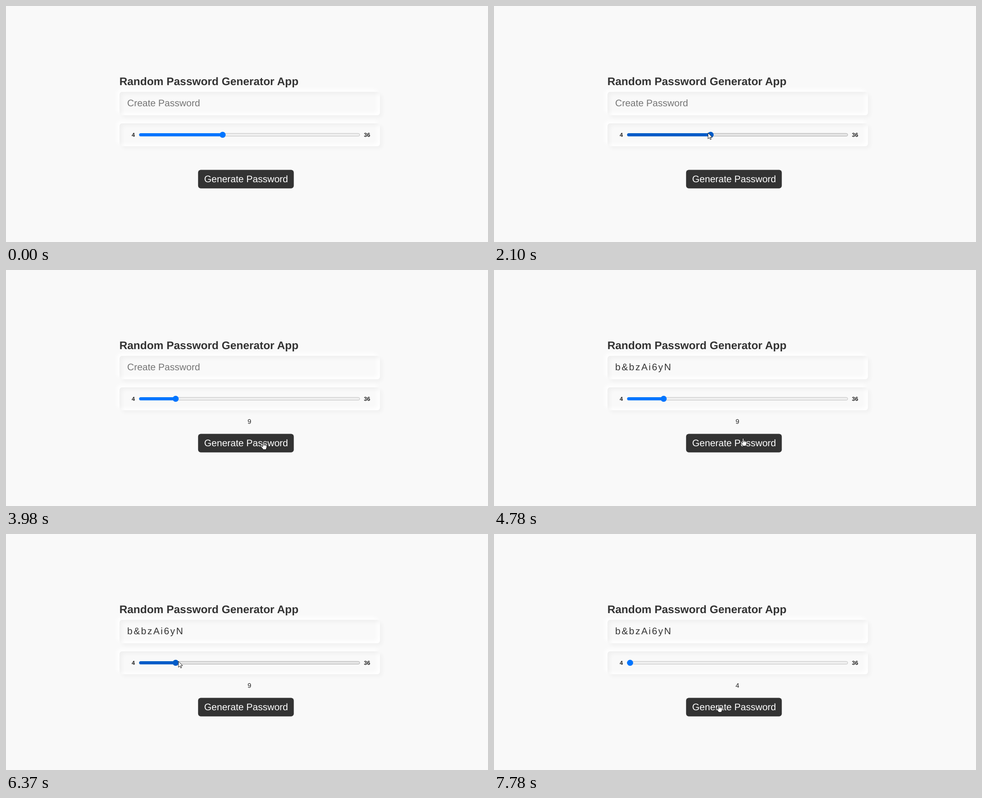
These frames come from a looping animation (1066 by 525 pixels, 8 s). An HTML page:

```html
<!DOCTYPE html>
<html lang="en">
<head>
<meta charset="utf-8">
<title>Random Password Generator App</title>
<style>
  html, body { margin: 0; width: 100%; height: 100%; overflow: hidden; background: #f9f9f9; }
  .panel {
    position: absolute; left: 251px; width: 576px; height: 51.5px; border-radius: 6px;
    box-shadow:
      5px 5px 10px rgba(0, 0, 0, .035), -5px -5px 10px #fff,
      inset 5px 5px 10px rgba(0, 0, 0, .04), inset -5px -5px 10px #fff;
  }
  svg { position: absolute; left: 0; top: 0; }
  text {
    font: 21px "Liberation Sans", Arial, sans-serif; fill: #333;
    white-space: pre; text-rendering: geometricPrecision;
  }
  .title { font-size: 24.4px; font-weight: bold; }
  .limit { font-size: 12.6px; font-weight: bold; fill: #222; }
  .placeholder { fill: #757575; }
  .password { letter-spacing: 2.45px; }
  .caption { fill: #fff; }
  #length { font-size: 14.5px; text-anchor: middle; fill: #222; }

  .idle { --accent: #0075ff; --track: #efefef; --border: #b8b8b8; }
  .hover { --accent: #005cc8; --track: #e5e5e5; --border: #a3a3a3; }
  .active { --accent: #3793ff; --track: #f5f5f5; --border: #cbcbcb; }
  #track { fill: var(--track); stroke: var(--border); stroke-width: .9; }
  #fill, #thumb { fill: var(--accent); }

  .cursor { fill: #fff; stroke: #000; stroke-width: 1.1; stroke-linejoin: round; }
</style>
</head>
<body>
<div class="panel" style="top:191px"></div>
<div class="panel" style="top:260.5px"></div>
<svg width="1066" height="525" viewBox="0 0 1066 525">
  <text class="title" x="250.7" y="175.8">Random Password Generator App</text>
  <text id="field" x="268" y="222.7"></text>
  <text class="limit" x="278" y="291">4</text>
  <text class="limit" x="791.6" y="291">36</text>
  <g id="slider">
    <rect id="track" x="294.9" y="283.4" width="487.4" height="6.2" rx="3.1"/>
    <rect id="fill" x="294.4" y="283" height="7" rx="3.5"/>
    <circle id="thumb" cy="286.5" r="6.7"/>
  </g>
  <text id="length" x="538.3" y="341.6"></text>
  <rect x="424.8" y="364.5" width="211.7" height="41.2" rx="6" fill="#333"/>
  <text class="caption" x="438.2" y="391.6">Generate Password</text>
  <g id="pointer">
    <circle id="press" cy=".5" r="11.5" fill="#ff0" fill-opacity=".5"/>
    <path id="arrow" class="cursor" transform="translate(.3 .3) scale(.8)"
      d="M0 0V16.5L4 12.9 6.4 18.6 9 17.5 6.5 12H11.8Z"/>
    <path id="hand" class="cursor" transform="translate(-6 0) scale(.82)"
      d="M5.8 1.8C5.8.2 8.8.2 8.8 1.8V7C9 6 11.8 6.2 11.8 7.5 12 6.8 14.4 7 14.4 8.5 15 7.8 16.8 8.2 16.8 9.7V14.2C16.8 17 14.8 18 14.8 21.3H6.6C6.6 18.5 3 16.5.8 12.6-.2 10.8 2.5 10.2 3.7 11.6L5.8 13.8ZM8.8 7V11M11.8 7.5V11M14.4 8.5V11"/>
  </g>
</svg>
<script>
const LOOP = 8000, UPDATE = 75;
const MIN = 4, MAX = 36, THUMB_MIN = 301, UNIT = 14.84;

const linear = k => k;
const accelerate = k => k ** 1.4;
const settle = k => 1 - (1 - k) ** 2;

// What the user does: glide to a point, optionally with the button held.
// "grip" is the thumb's distance from the pointer while it is dragged.
const actions = [
  { start: 320, end: 1170, to: [713, 437], ease: accelerate },
  { start: 1170, end: 1250, to: [629, 388] },
  { start: 1250, end: 2030, to: [473, 282] },
  { start: 2280, end: 2950, to: [374, 290], ease: settle, press: true, grip: 6 },
  { start: 3020, end: 3100, to: [379, 296] },
  { start: 3270, end: 3810, to: [569, 382], sag: 80 },
  { start: 4210, end: 4280, to: [569, 382], press: true, generates: true },
  { start: 4710, end: 5530, to: [373, 294] },
  { start: 5700, end: 6000, to: [301, 294], press: true },
  { start: 6000, end: 6370, to: [381, 283] },
  { start: 6470, end: 7090, release: 7260, to: [283, 290], sag: 9, press: true, grip: -6 },
  { start: 7260, end: 7780, to: [497, 379] }
];

const el = Object.fromEntries([...document.querySelectorAll('[id]')].map(e => [e.id, e]));
const show = (node, on) => { node.style.display = on ? '' : 'none'; };
const inside = ([x, y], left, top, right, bottom) =>
  x >= left && x < right && y >= top && y < bottom;
const lerp = (a, b, k) => a + (b - a) * k;

// Progress advances in visible steps, as in a screen recording.
function progress({ start, end }, t) {
  const steps = Math.round((end - start) / UPDATE);
  return Math.min(1, Math.floor((t - start) / (end - start) * steps + .1) / steps);
}

function valueUnder(thumbX) {
  const value = Math.round(MIN + (thumbX - THUMB_MIN) / UNIT);
  return Math.max(MIN, Math.min(MAX, value));
}

function stateAt(t) {
  const state = { tip: [959, 513], value: 16, length: '', filled: false };
  for (const action of actions) {
    if (t < action.start) break;
    const { to, ease = linear, sag = 0, press, grip, generates } = action;
    const k = progress(action, t), eased = ease(k);
    const held = t < (action.release ?? action.end);
    const [x, y] = state.tip;
    state.tip = [
      lerp(x, to[0], eased),
      lerp(y, to[1], eased) + sag * Math.sin(Math.PI * k)
    ].map(Math.round);
    state.pressed = press && held;
    state.dragging = state.pressed && grip !== undefined;
    if (grip !== undefined) {
      state.value = valueUnder(state.tip[0] + grip);
      if (!held) state.length = state.value;
    }
    if (generates && !held) state.filled = true;
  }
  return state;
}

function render(t) {
  const { tip, value, length, filled, pressed, dragging } = stateAt(t);
  const overSlider = inside(tip, 294, 280, 783, 294);
  const overButton = inside(tip, 425, 365, 637, 406);
  const thumbX = THUMB_MIN + (value - MIN) * UNIT;

  el.slider.setAttribute('class', dragging ? 'active' : overSlider ? 'hover' : 'idle');
  el.fill.setAttribute('width', thumbX - 294.4);
  el.thumb.setAttribute('cx', thumbX);
  el.field.textContent = filled ? 'b&bzAi6yN' : 'Create Password';
  el.field.setAttribute('class', filled ? 'password' : 'placeholder');
  el.length.textContent = length;

  el.pointer.setAttribute('transform', `translate(${tip})`);
  show(el.pointer, t >= 70);
  show(el.arrow, !overButton);
  show(el.hand, overButton);
  show(el.press, pressed);
}

const began = performance.now();
function loop() {
  render((performance.now() - began) % LOOP);
  requestAnimationFrame(loop);
}
loop();
</script>
</body>
</html>
```
